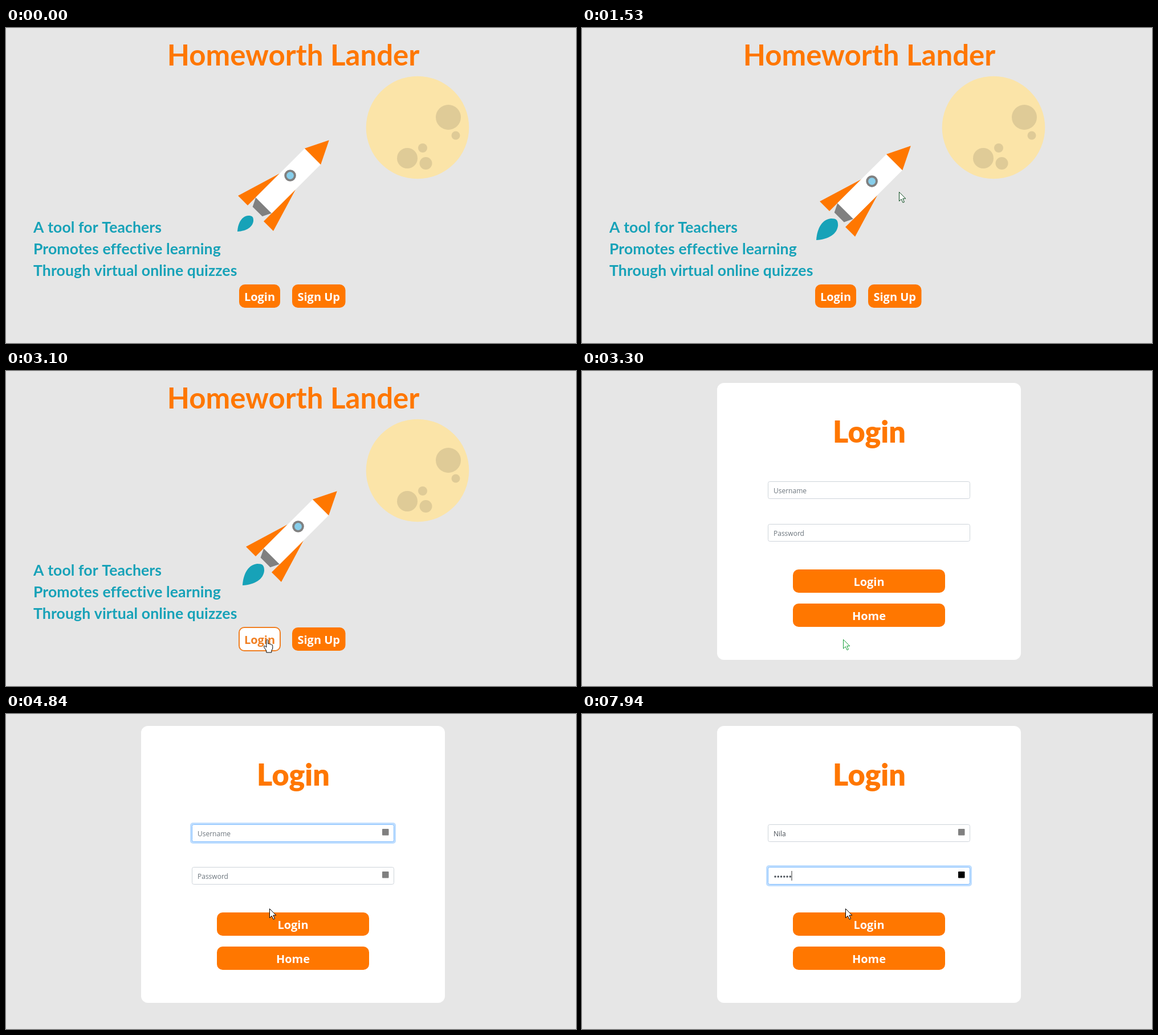
Animation, 1000 px wide and 554 px high, one loop 8000 ms. Source, as an HTML page with a canvas:

```html
<!DOCTYPE html>
<html lang="en">
<head>
<meta charset="utf-8">
<title>Quiz login</title>
<style>
html, body { margin: 0; width: 100%; height: 100%; overflow: hidden; background: #e6e6e6; }
canvas { display: block; }
</style>
</head>
<body>
<canvas id="stage" width="1000" height="554"></canvas>
<script>
const ctx = document.getElementById('stage').getContext('2d');
const LOOP = 8000;
const HOVER = 2640, LOGIN_PAGE = 3300, FOCUS = 4380, LEAVE = 4840, TAB = 6360;
const ORANGE = '#ff7700', TEAL = '#17a2b8', GRAY = '#808080';
const DISPLAY = 'Lato, sans-serif', UI = '"Open Sans", "Noto Sans", sans-serif';

// Pointer route: time, x, y.
const ROUTE = [[780, 917, 523], [1090, 818, 345], [1530, 556, 288], [2180, 545, 310],
  [HOVER, 459, 472], [LOGIN_PAGE, 458, 472], [4230, 452, 212], [LEAVE, 462, 342]];
const ARROW = new Path2D('M.5 .5V16.5L4.2 13L7 19L9.5 18L6.8 12H11.8Z');
const BEAM = new Path2D('M-3 -8H3M0 -8V8M-3 8H3');
const HAND = new Path2D('M-1.5 1.5Q0 -1 1.5 1.5V8Q3.5 6.5 4.5 8.5Q6.5 7.5 7.3 9.5Q9.5 9 9.5 11.5V16L7.5 20V23H-1.5V20L-5.5 14Q-6.5 11 -4 11.5L-1.5 14Z');
const FLAME = new Path2D('M-14 14C-13 -2 -6 -13 5 -14C12 -14 14 -12 14 -5C13 6 2 13 -14 14Z');

const typed = (t, start, gap, max) =>
  Math.max(0, Math.min(max, Math.floor((t - start) / gap) + 1));

function poly(color, ...p) {
  ctx.beginPath();
  for (let i = 0; i < p.length; i += 2) ctx.lineTo(p[i], p[i + 1]);
  ctx.fillStyle = color;
  ctx.fill();
}

function disc(color, x, y, r) {
  ctx.beginPath();
  ctx.arc(x, y, r, 0, Math.PI * 2);
  ctx.fillStyle = color;
  ctx.fill();
}

function box(x, y, w, h, r, fill, border, width = 1) {
  ctx.beginPath();
  ctx.roundRect(x, y, w, h, r);
  ctx.fillStyle = fill;
  ctx.fill();
  if (border) {
    ctx.strokeStyle = border;
    ctx.lineWidth = width;
    ctx.stroke();
  }
}

function text(str, x, y, font, color, align = 'left', spacing = 0) {
  ctx.font = font;
  ctx.letterSpacing = spacing + 'px';
  ctx.textAlign = align;
  ctx.fillStyle = color;
  ctx.fillText(str, x, y);
}

function button(label, x, y, w, hover) {
  const ink = '#f07f22';
  if (hover) box(x, y, w, 41, 9, '#fff', ink, 2);
  else box(x, y, w, 41, 10, ORANGE);
  text(label, x + w / 2, y + 29, '700 20px ' + UI, hover ? ink : '#fff', 'center');
}

function flame(scale) {
  ctx.save();
  ctx.translate(420, 344);
  ctx.scale(scale, scale);
  ctx.fillStyle = TEAL;
  ctx.fill(FLAME);
  ctx.restore();
}

function rocket(t) {
  const drift = 14 * Math.sin(Math.PI / 2 * t / 3000);
  ctx.save();
  ctx.translate(drift, drift);
  flame(1 + .36 * Math.min(1, t / 140));
  // Upright rocket, its axis on x = 0 and the top of the body on y = 0.
  ctx.translate(538, 226);
  ctx.rotate(Math.PI / 4);
  for (const side of [-1, 1]) poly(ORANGE, 19.8 * side, 62, 19.8 * side, 141.4, 43.8 * side, 141.4);
  poly(GRAY, -19.8, 121, 19.8, 121, 12, 137, -12, 137);
  poly('#fff', -19.8, 0, 19.8, 0, 19.8, 121.6, -19.8, 121.6);
  poly(ORANGE, 0, -40.7, 20, 0, -20, 0);
  disc(GRAY, -4.2, 51.6, 10.3);
  disc('#87ceeb', -4.2, 51.6, 6.4);
  ctx.restore();
}

function moon() {
  disc('#fbe4a8', 722, 175, 90.3);
  for (const crater of [[776, 157, 22], [789, 189, 7.5], [704, 229, 18], [731, 211, 8], [736.5, 238, 11]])
    disc('#dfcb97', ...crater);
}

function homePage(t) {
  text('Homeworth Lander', 504, 66, '700 51px ' + DISPLAY, ORANGE, 'center');
  moon();
  rocket(t);
  ['A tool for Teachers', 'Promotes effective learning', 'Through virtual online quizzes']
    .forEach((line, i) => text(line, 48, 360 + 38 * i, '700 26.6px ' + DISPLAY, TEAL, 'left', .1));
  button('Login', 409, 451, 72, t >= HOVER);
  button('Sign Up', 502, 451, 93.5);
}

function field(y, placeholder, { focus, value, dots = 0, caret, icon }) {
  if (focus) box(323, y - 3, 361, 37, 5, '#bfdeff');
  box(326.5, y + .5, 354, 30, 3, '#fff', focus ? '#80bdff' : '#ced4da');
  let end = 336 + 5.25 * dots;
  for (let i = 0; i < dots; i++) disc('#495057', 339 + 5.25 * i, y + 17, 1.7);
  if (!dots) {
    text(value || placeholder, 336, y + 20.5, '12px ' + UI, value ? '#495057' : '#6c757d');
    if (value) end += ctx.measureText(value).width;
  }
  if (caret) box(end, y + 7, 1, 17, 0, '#333');
  if (icon) box(660, y + 8, 11.5, 11.5, 1, icon);
}

function loginPage(t) {
  const active = t >= FOCUS, onPass = t >= TAB, ringMoved = t >= TAB + 230;
  box(237, 21, 533, 487, 12, '#fff');
  text('Login', 504, 126, '900 52px ' + DISPLAY, ORANGE, 'center');
  field(194, 'Username', {
    focus: active && !ringMoved,
    value: 'Nila'.slice(0, typed(t, 5600, 155, 4)),
    caret: active && !onPass && (t < LEAVE || t >= 5440),
    icon: active && (t < LEAVE ? '#000' : GRAY)
  });
  field(269, 'Password', {
    focus: ringMoved,
    dots: typed(t, 6860, 216, 6),
    caret: onPass,
    icon: active && (onPass ? '#000' : GRAY)
  });
  button('Login', 370, 349, 267);
  button('Home', 370, 409, 267);
}

function pointer(t) {
  if (t < ROUTE[0][0]) return;
  const i = ROUTE.findLastIndex(p => p[0] <= t);
  const [t0, x0, y0] = ROUTE[i], [t1, x1, y1] = ROUTE[i + 1] || [LOOP, x0, y0];
  const k = (t - t0) / (t1 - t0);
  const x = x0 + (x1 - x0) * k, y = y0 + (y1 - y0) * k;
  const onButton = t >= HOVER && t < LOGIN_PAGE;
  const onField = t > LOGIN_PAGE && y > 194 && y < 225;
  const shape = onButton ? HAND : onField ? BEAM : ARROW;
  ctx.save();
  ctx.translate(x, y);
  ctx.fillStyle = '#fff';
  ctx.strokeStyle = t < HOVER ? '#0b4a1e' : !onButton && t < 3630 ? '#14a038' : '#000';
  ctx.lineWidth = 1;
  ctx.fill(shape);
  ctx.stroke(shape);
  ctx.restore();
}

function draw() {
  const t = performance.now() % LOOP;
  ctx.fillStyle = '#e6e6e6';
  ctx.fillRect(0, 0, 1000, 554);
  (t < LOGIN_PAGE ? homePage : loginPage)(t);
  pointer(t);
  requestAnimationFrame(draw);
}
draw();
</script>
</body>
</html>
```
